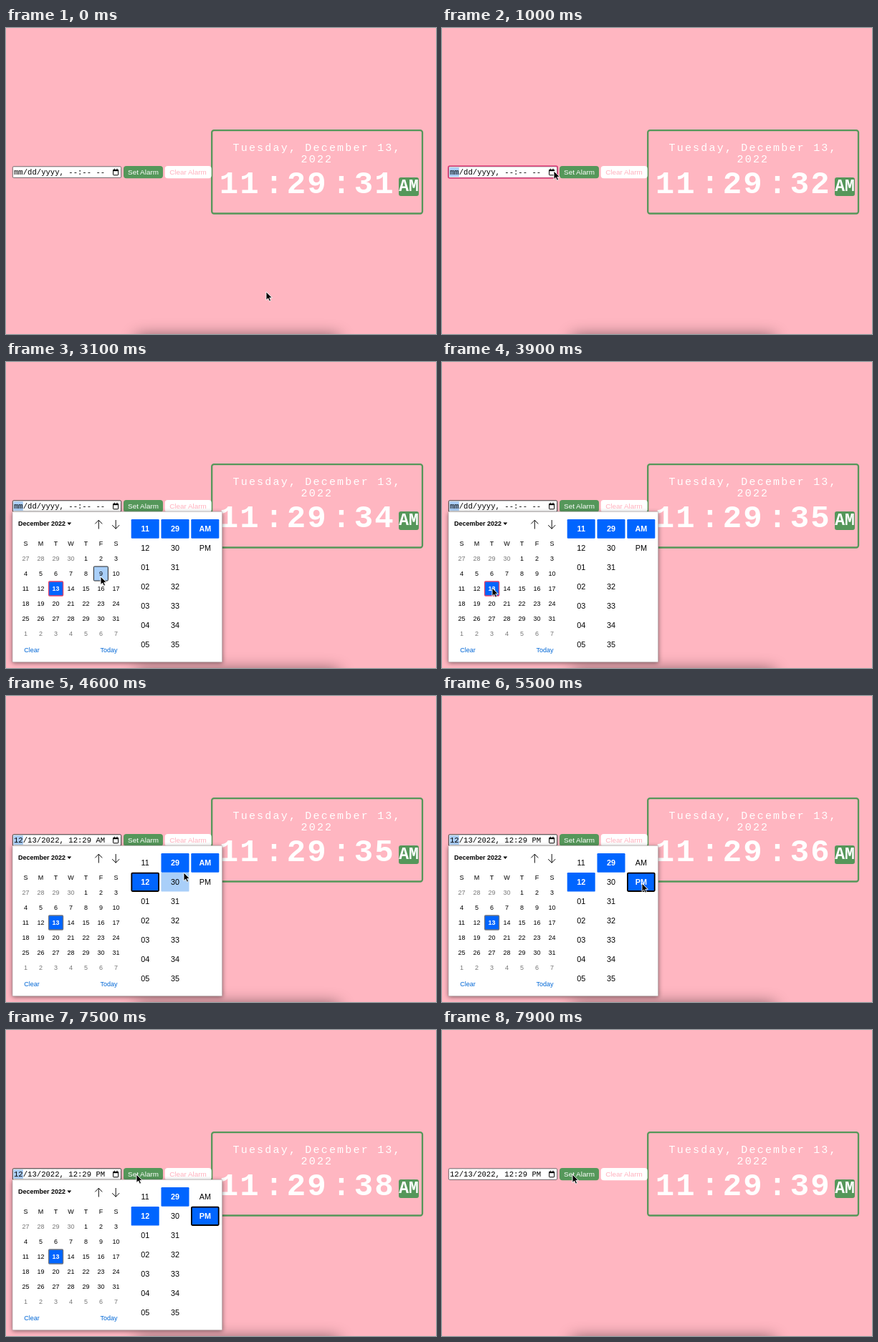
These frames come from a looping animation (600x428 px, 8 s). An HTML page:

```html
<!DOCTYPE html>
<html lang="en">
<head>
<meta charset="utf-8">
<title>Alarm clock</title>
<style>
  html, body { margin: 0; width: 100%; height: 100%; overflow: hidden; background: #ffb6c1; }
  svg { display: block; width: 600px; height: 428px; }
  text { font-family: "Liberation Sans", Arial, sans-serif; white-space: pre; }
  .mono { font-family: "Liberation Mono", "Courier New", monospace; }
  .mid { text-anchor: middle; }
  .bold { font-weight: bold; }
  .date { font-size: 15px; letter-spacing: 2.2px; fill: #fff; }
  .digits { font-size: 44px; font-weight: bold; fill: #fff; }
  .field { font-size: 10.6px; }
  .button { font-size: 9.9px; }
  .small { font-size: 9px; }
  .time { font-size: 10.8px; }
  .link { fill: #0067d6; }
</style>
</head>
<body>
<svg viewBox="0 0 600 428">
  <defs>
    <filter id="dock" x="-50%" y="-200%" width="200%" height="500%"><feGaussianBlur stdDeviation="11"/></filter>
    <filter id="soft" x="-10%" y="-10%" width="120%" height="120%"><feGaussianBlur stdDeviation="3"/></filter>
  </defs>
  <rect width="600" height="428" fill="#ffb6c1"/>
  <rect x="182" y="431" width="282" height="40" fill="#000" opacity=".55" filter="url(#dock)"/>

  <rect x="287.2" y="143.1" width="293.8" height="116.4" rx="3" fill="none" stroke="#55975a" stroke-width="2.3"/>
  <text class="mono date" x="316.5" y="172">Tuesday, December 13,</text>
  <text class="mono date" x="411.5" y="188">2022</text>
  <g id="clock"></g>
  <rect x="548" y="209" width="28" height="26" rx="3" fill="#55975a"/>
  <text class="mono bold mid" x="562" y="228" font-size="23" fill="#fff">AM</text>

  <g id="field"></g>
  <g fill="none" stroke="#000">
    <rect x="149.6" y="198.4" width="7" height="7.4" rx=".8"/>
    <path d="M149.2 199.2h7.8" stroke-width="2"/>
    <path d="M151.2 196.6v2M155 196.6v2"/>
  </g>
  <rect x="164" y="193" width="55" height="17.3" rx="4" fill="#55975a"/>
  <text class="button mid" x="191.5" y="205.2" fill="#fff">Set Alarm</text>
  <rect x="221.7" y="193" width="65" height="17.3" rx="4" fill="#fff"/>
  <text class="button mid" x="254" y="205.2" fill="#ffb0bd">Clear Alarm</text>

  <g id="popup">
    <rect x="9" y="211" width="293" height="210" fill="#000" opacity=".5" filter="url(#soft)"/>
    <rect x="9" y="209.3" width="292.6" height="210.4" rx="1" fill="#fff" stroke="#a9a0a2" stroke-width=".6"/>
    <text class="small bold" x="17" y="229.4">December 2022</text>
    <path d="M85.4 224.6h5.8l-2.9 3.4z"/>
    <path d="M129.3 233.5v-12.3m-5 5.2 5-5.2 5 5.2M153.2 221v12.3m-5-5.2 5 5.2 5-5.2" fill="none" stroke="#111"/>
    <text class="small link" x="25.3" y="406.4">Clear</text>
    <text class="small link" x="131.6" y="406.4">Today</text>
    <g id="cells"></g>
  </g>
  <path id="cursor" d="M0 0V11.6L2.7 9.1 4.5 13.2 6.6 12.3 4.8 8.3H8.4Z" stroke="#fff" stroke-width=".9"/>
</svg>
<script>
const LOOP = 8000, STEP = 100;
const FOCUS = 900, OPEN = 1100, PICK_DAY = 4000, PICK_HOUR = 4300, PICK_PM = 5400, CLOSE = 7600;
const BLUE = '#0065ff', HOVER = '#a9cff9';
const ROW = 26.9, DAY = 21;

// Pointer stops: time, x, y
const stops = [
  [0, 363, 369], [100, 235, 255], [200, 135, 171], [300, 135, 171],
  [800, 156, 200], [1100, 156, 200], [1900, 118, 266], [3100, 132, 300],
  [3800, 70, 316], [4000, 70, 316], [4300, 196, 262], [4600, 248, 247],
  [5200, 279, 262], [5600, 279, 262], [6500, 241, 304], [6900, 240, 304],
  [7500, 182, 202], [8000, 182, 202]
];

const $ = id => document.getElementById(id);

function pointer(t) {
  const i = stops.findIndex(s => s[0] > t);
  const [t0, x0, y0] = stops[i - 1], [t1, x1, y1] = stops[i];
  const p = (t - t0) / (t1 - t0), e = p * p * (3 - 2 * p);
  return [x0 + (x1 - x0) * e, y0 + (y1 - y0) * e];
}

const label = (x, y, s, cls, fill = '#000') =>
  `<text class="${cls}" x="${x}" y="${y}" fill="${fill}">${s}</text>`;

const box = (cx, cy, w, h, fill, stroke = 'none', sw = 1) =>
  `<rect x="${cx - w / 2}" y="${cy - h / 2}" width="${w}" height="${h}" rx="1.2" fill="${fill}" stroke="${stroke}" stroke-width="${sw}"/>`;

const pad = n => String(n).padStart(2, '0');

function clock(t) {
  const sec = 31 + Math.floor((t + 200) / 1000);
  const pair = (s, x) => [...s].map((c, i) => label(x + 28.4 * i, 231, c, 'mono digits mid', '#fff')).join('');
  const colon = x => label(x, 231, ':', 'mono digits mid', '#fff');
  return pair('11', 311) + colon(374) + pair('29', 405) + colon(468) + pair(String(sec), 499);
}

function field(t) {
  const focused = t >= FOCUS && t < CLOSE, open = t >= OPEN && t < CLOSE;
  const value = t < PICK_DAY ? 'mm/dd/yyyy, --:-- --'
    : `12/13/2022, ${t < PICK_HOUR ? 11 : 12}:29 ${t < PICK_PM ? 'AM' : 'PM'}`;
  const ring = focused && !open
    ? '<rect x="8.6" y="193" width="152.8" height="17" rx="2.5" fill="none" stroke="#df3f7c" stroke-width="1.5"/>' : '';
  return `<rect x="9.3" y="193.8" width="151.4" height="15.6" rx="1.5" fill="#fff" stroke="${open ? '#333' : '#6d6468'}" stroke-width="1"/>`
    + ring
    + (focused ? '<rect x="10.5" y="195.2" width="13.3" height="12.8" fill="#a9cdf5"/>' : '')
    + label(11, 205.2, value, 'mono field');
}

function days(t, px, py) {
  let out = '';
  const hoverCol = Math.floor((px - 17) / DAY), hoverRow = Math.floor((py - 264.5) / DAY);
  [...'SMTWTFS'].forEach((d, c) => { out += label(27.4 + DAY * c, 257, d, 'small mid'); });
  for (let i = 0; i < 42; i++) {
    const col = i % 7, row = Math.floor(i / 7);
    const x = 27.4 + DAY * col, y = 275 + DAY * row;
    const n = i - 3, day = n < 1 ? n + 30 : n > 31 ? n - 31 : n;
    const chosen = n === 13, over = col === hoverCol && row === hoverRow;
    if (chosen) {
      const edge = t < PICK_DAY ? '#e8436a' : t < PICK_HOUR ? '#000' : '#6f7480';
      out += box(x + .2, y, 20, 20, BLUE, edge, 1.3);
    } else if (over) {
      out += box(x, y, 20, 20, HOVER, '#222');
    }
    out += label(x, y + 3.3, day, 'small mid' + (chosen ? ' bold' : ''),
      chosen ? '#fff' : day !== n ? '#777' : '#000');
  }
  return out;
}

function column(cx, items, chosen, focused, px, py) {
  const over = Math.abs(px - cx) < 19.5 ? Math.floor((py - 220) / ROW) : -1;
  return items.map((s, i) => {
    const y = 233.4 + ROW * i, on = i === chosen;
    const back = on
      ? focused ? box(cx, y, 37.8, 25.4, BLUE, '#000', 1.8) : box(cx, y, 39, 26.6, BLUE)
      : i === over ? box(cx, y, 39, 26.6, HOVER) : '';
    return back + label(cx, y + 3.9, s, 'time mid' + (on ? ' bold' : ''), on ? '#fff' : '#000');
  }).join('');
}

function cells(t, px, py) {
  const seven = [...Array(7).keys()];
  const hours = seven.map(i => pad((i + 10) % 12 + 1)), minutes = seven.map(i => pad(29 + i));
  return days(t, px, py)
    + column(194.2, hours, t < PICK_HOUR ? 0 : 1, t >= PICK_HOUR && t < PICK_PM, px, py)
    + column(236, minutes, 0, false, px, py)
    + column(277.8, ['AM', 'PM'], t < PICK_PM ? 0 : 1, t >= PICK_PM, px, py);
}

let shown = -1;
function frame(now) {
  const t = Math.floor(now % LOOP / STEP) * STEP;
  if (t !== shown) {
    shown = t;
    const [px, py] = pointer(t);
    $('clock').innerHTML = clock(t);
    $('field').innerHTML = field(t);
    $('cells').innerHTML = cells(t, px, py);
    $('popup').style.display = t >= OPEN && t < CLOSE ? '' : 'none';
    $('cursor').setAttribute('transform', `translate(${px} ${py})`);
  }
}

const start = performance.now();
function loop() {
  frame(performance.now() - start);
  requestAnimationFrame(loop);
}
loop();
</script>
</body>
</html>
```
